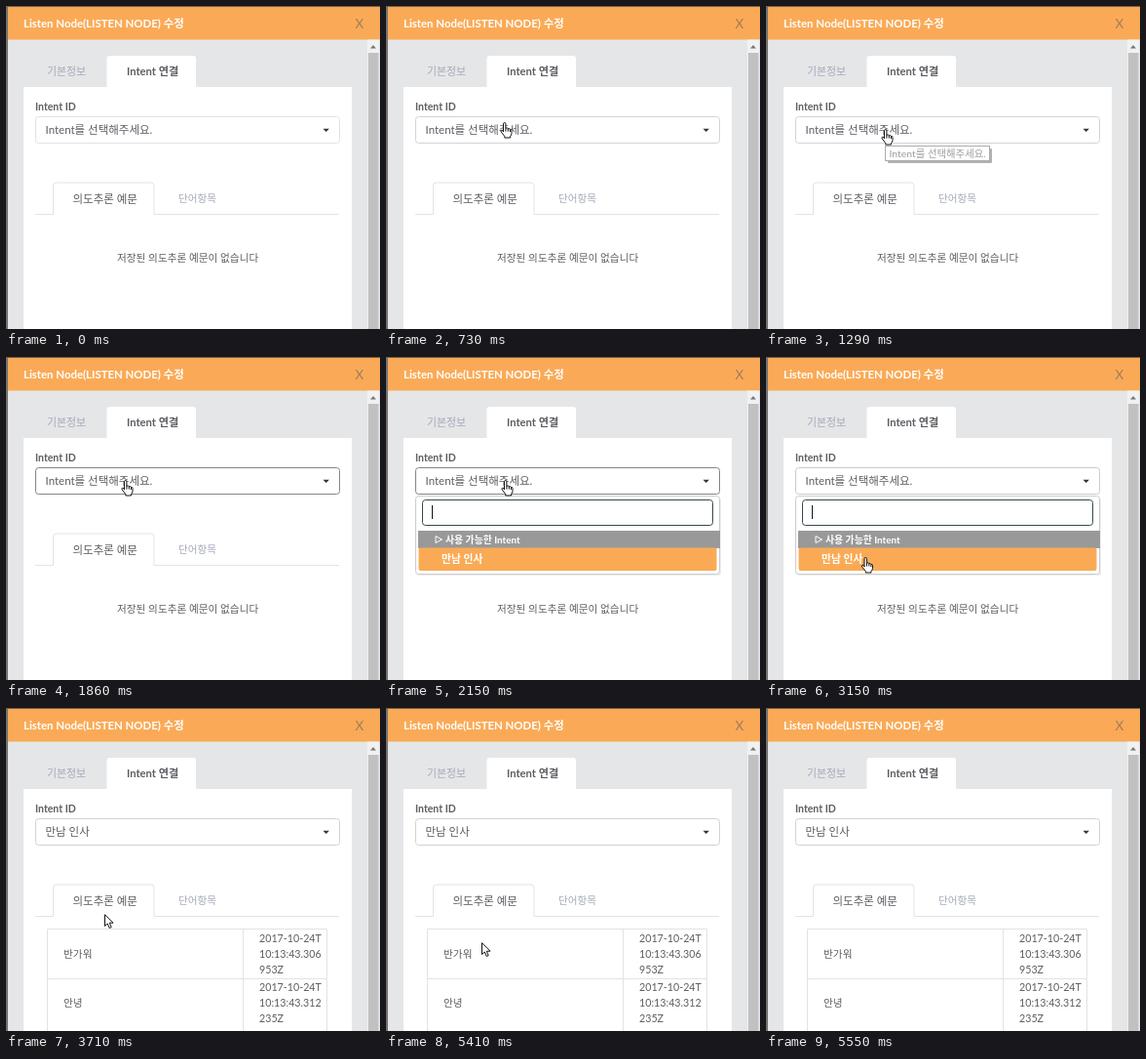
An HTML page that plays this animation: 384 by 331 pixels, repeating every 6.54 s.

```html
<!DOCTYPE html>
<html lang="ko">
<head>
<meta charset="utf-8">
<style>
  html, body { margin: 0; width: 100%; height: 100%; overflow: hidden; }
  svg { display: block; width: 100vw; height: 100vh; }
  text { font-family: Lato, "Noto Sans CJK KR", "Noto Sans CJK", sans-serif; fill: #5c5e63; white-space: pre; }
  .bold { font-weight: 700; }
  .muted { fill: #a3a9b8; }
  .light { fill: #fff; }
  .line { fill: none; stroke: #dfe3ec; }
  .cursor { fill: #fff; stroke: #111; stroke-linejoin: round; }
</style>
</head>
<body>
<svg viewBox="0 0 384 331" preserveAspectRatio="none">
  <rect width="384" height="331" fill="#e5e6e8"/>
  <rect width="2" height="331" fill="#777571"/>
  <rect x="2" y="1" width="382" height="33.5" fill="#faaa57"/>
  <rect width="384" height="1" fill="#7d6448"/>
  <text class="bold light" x="18" y="22" font-size="11.4">Listen Node(LISTEN NODE) 수정</text>
  <text x="358.5" y="22.5" font-size="13.5" style="fill:#a57d55">X</text>

  <rect x="371" y="34.5" width="12" height="297" fill="#f1f1f1"/>
  <path d="M374 43.5l3-3.5 3 3.5z" fill="#777"/>
  <rect x="372" y="48" width="10.5" height="283" fill="#c1c1c1"/>

  <path d="M18 331V83h85.5V54q0-3 3-3h85.5q3 0 3 3v29h160v248z" fill="#fff"/>
  <text class="muted" x="42" y="71" font-size="10.9">기본정보</text>
  <text class="bold" x="124" y="71" font-size="11.2">Intent 연결</text>
  <text class="bold" x="30" y="106.5" font-size="10.5">Intent ID</text>

  <rect id="select" x="30.5" y="113.5" width="312" height="27" rx="3" fill="#fff"/>
  <text id="value" x="40.5" y="131.3" font-size="11.5"></text>
  <path d="M325.5 125.7h6.4l-3.2 3.4z" fill="#333"/>

  <path class="line" d="M30 213.5h18.5V184q0-3 3-3h97.5q3 0 3 3v29.5H342"/>
  <text x="68.5" y="202" font-size="11.5">의도추론 예문</text>
  <text class="muted" x="177" y="201" font-size="10.6">단어항목</text>
  <text id="empty" x="114" y="262" font-size="10.65">저장된 의도추론 예문이 없습니다</text>

  <g id="table" font-size="10.7">
    <path d="M42.5 331V226.500H329.500V331M243.500 226.500V331M42.500 277.500H329.500" fill="none" stroke="#e4e2e4"/>
  </g>

  <g id="popup">
    <rect x="31" y="144" width="313" height="80" rx="3" fill="#000" opacity=".07"/>
    <rect x="30.5" y="142.5" width="312" height="80" rx="3" fill="#fff" stroke="#ccc"/>
    <rect id="search" x="37.5" y="146.5" width="298" height="26" rx="3" fill="#fff"/>
    <path id="caret" d="M47.5 152v14" stroke="#111"/>
    <rect x="33" y="178" width="310" height="18" fill="#999"/>
    <path d="M51 183.500l6.500 3.500-6.500 3.500z" fill="none" stroke="#fff"/>
    <text class="bold light" x="61" y="191" font-size="9.9">사용 가능한 Intent</text>
    <rect x="33.5" y="195.5" width="306" height="23.500" rx="2" fill="#faaa55"/>
    <text class="bold light" x="57" y="211" font-size="10.8">만남 인사</text>
  </g>

  <g id="tooltip">
    <rect x="125" y="146" width="107" height="15" rx="1" fill="#000" opacity=".5"/>
    <rect x="122.5" y="143.500" width="107" height="15" fill="#fff" stroke="#767676"/>
    <text x="126.5" y="155" font-size="10.4">Intent를 선택해주세요.</text>
  </g>

  <path id="hand" class="cursor" d="M3 10V1.700Q3 .5 4.200 .5T5.400 1.700V6.200Q7.500 5.200 7.800 6.800 9.500 6 9.900 7.500 11.500 7 11.500 8.700V11.500Q11.500 13 10 14.500V16H4.300V14.500L.8 10.200Q-.2 8.700 1 8.200T3 10M5.400 6.200V9.500M7.800 6.800V9.500M9.900 7.500V10"/>
  <path id="arrow" class="cursor" d="M.5 .7V12.500L3.300 10 5.200 14.500 7.200 13.600 5.300 9.200H9z"/>
</svg>
<script>
const LOOP = 6540;
const PRESS = 1860, OPEN = 2000, CHOOSE = 3710;
const $ = id => document.getElementById(id);

const pointerSteps = [
  [0, null],
  [450, 'arrow', 108, 246],
  [590, 'arrow', 114, 168],
  [730, 'hand', 117.5, 119],
  [1010, 'hand', 118, 123],
  [1150, 'hand', 118.5, 126],
  [2440, 'hand', 117, 137],
  [2580, 'hand', 108, 184],
  [2720, 'hand', 102.5, 201],
  [2860, 'hand', 83, 204],
  [3000, 'hand', 98, 205],
  [3430, 'hand', 99, 206],
  [CHOOSE, 'arrow', 101, 211],
  [5410, 'arrow', 98, 240],
  [5550, null]
];
const borderSteps = [
  [0, '#dfe2e8'], [730, '#d0d4da'], [PRESS, '#858585'], [2720, '#c9ccd0'], [CHOOSE, '#d2d3ce']
];
const searchSteps = [
  [0, '#ccc'], [OPEN, '#7c8488'], [2150, '#35474b'], [3570, '#7c8488']
];
const caretSteps = [[0, false], [OPEN, true], [2580, false], [3150, true], [3570, false]];
const tooltipSteps = [[0, 0], [1290, 0.6], [1440, 1], [PRESS, 0]];

const stepAt = (steps, t) => steps.findLast(step => step[0] <= t);
const show = (id, on) => $(id).setAttribute('visibility', on ? 'inherit' : 'hidden');

function addText(parent, x, y, content) {
  const node = document.createElementNS('http://www.w3.org/2000/svg', 'text');
  node.setAttribute('x', x);
  node.setAttribute('y', y);
  node.textContent = content;
  parent.append(node);
}

[['반가워', '306', '953Z'], ['안녕', '312', '235Z']].forEach(([phrase, millis, rest], row) => {
  const top = row * 50;
  addText($('table'), 59, 256.3 + top, phrase);
  ['2017-10-24T', '10:13:43.' + millis, rest].forEach((part, i) =>
    addText($('table'), 260, 240.3 + top + i * 15.7, part));
});

function render(t) {
  const chosen = t >= CHOOSE;
  $('value').textContent = chosen ? '만남 인사' : 'Intent를 선택해주세요.';
  $('select').setAttribute('stroke', stepAt(borderSteps, t)[1]);
  $('search').setAttribute('stroke', stepAt(searchSteps, t)[1]);
  $('tooltip').setAttribute('opacity', stepAt(tooltipSteps, t)[1]);
  show('empty', !chosen);
  show('table', chosen);
  show('popup', t >= OPEN && !chosen);
  show('caret', stepAt(caretSteps, t)[1] && !chosen);

  const [, shape, x, y] = stepAt(pointerSteps, t);
  for (const id of ['hand', 'arrow']) {
    show(id, id === shape);
    if (id === shape) $(id).setAttribute('transform', `translate(${x} ${y})`);
  }
}

const start = performance.now();
function tick() {
  render((performance.now() - start) % LOOP);
  requestAnimationFrame(tick);
}
tick();
</script>
</body>
</html>
```
